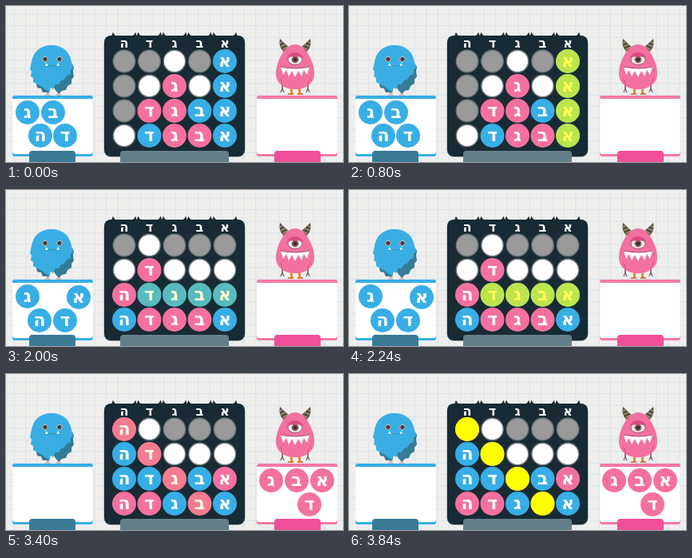
An HTML page for the animation above (4360 ms loop, 422 by 195 pixels).

```html
<!DOCTYPE html>
<html lang="he">
<head>
<meta charset="utf-8">
<style>
  html, body { margin: 0; width: 100%; height: 100%; overflow: hidden; background: #f0f0ed; }
  svg { display: block; width: 100%; height: 100%; }
  text { font-family: "Open Sans", "DejaVu Sans", sans-serif; font-weight: 700; text-anchor: middle; fill: #fff; }
</style>
</head>
<body>
<svg viewBox="0 0 422 195" preserveAspectRatio="none">
  <defs>
    <pattern id="fine" width="4.8" height="4.8" patternUnits="userSpaceOnUse">
      <path d="M.5 0V4.8M0 .5H4.8" stroke="#e8e9e8" stroke-width=".6"/>
    </pattern>
    <pattern id="paper" width="14.4" height="14.4" patternUnits="userSpaceOnUse">
      <path d="M10.5 0V14.4M0 10.5H14.4" stroke="#d6e1ee" stroke-width=".8"/>
    </pattern>
    <g id="tray">
      <rect y="70" width="101" height="6" rx="3"/>
      <rect x=".5" y="1" width="100" height="72" rx="2" fill="#fff"/>
      <path d="M0 4V3Q0 0 3 0H98Q101 0 101 3V4Z"/>
    </g>
    <path id="base" d="M0 14V4Q0 0 4 0H54Q58 0 58 4V14Z"/>
  </defs>
  <rect width="422" height="195" fill="#f0f0ed"/>
  <rect width="422" height="195" fill="url(#fine)"/>
  <rect width="422" height="195" fill="url(#paper)"/>

  <!-- blue monster -->
  <g>
    <path d="M52 105V110M66 105V110" stroke="#c99277" stroke-width="1.6"/>
    <path d="M49 111H55M63 111H69" stroke="#c99277" stroke-width="1.2"/>
    <path d="M78 66L85 76L84 82L85 88L82 92L82 97L77 100L75 105L70 106L66 110L61 104L58 96Z" fill="#347b98"/>
    <path d="M57 49C71 49 80 57 82 70L84 78L81 79L81 85L76 87L73 92L69 93L66 98L62 98L59 104L56 102L54 109L49 107L46 108L44 103L39 102L38 97L34 95L34 90L31 88L32 82L30 79L32 70C34 57 43 49 57 49Z" fill="#3aaee3"/>
    <path d="M55 108L46 108L44 103L39 102L38 97L34 95Q46 101 55 108Z" fill="#347b98"/>
    <g fill="#51392f" stroke="#b9cbd0" stroke-width="1">
      <circle cx="49" cy="66.5" r="3.2"/><circle cx="67" cy="66.5" r="3.2"/>
    </g>
    <path d="M49 75L50.5 71L53 75ZM63 75L65.5 71L67 75Z" fill="#fff"/>
    <path d="M48 75.5Q58 73.5 68 75.5" fill="none" stroke="#2f8ab4" stroke-width=".8"/>
  </g>

  <!-- pink monster -->
  <g>
    <path d="M347 57Q341 50 343 41Q349 47 355 52ZM377 57Q383 50 381 41Q375 47 369 52Z" fill="#575043"/>
    <path d="M342 47L346 44.5M343 51L350 48M346 55L353 51M382 47L378 44.5M381 51L374 48M378 55L371 51" stroke="#b3a67c" stroke-width="1.3"/>
    <path d="M357.5 100V109M367.5 100V109" stroke="#e98b45" stroke-width="3"/>
    <path d="M353 110H360M365 110H372" stroke="#d37b40" stroke-width="2"/>
    <path d="M342 90Q347 96 346 104M382 90Q377 96 378 104" fill="none" stroke="#6d6465" stroke-width="1.5"/>
    <path d="M344 108L346 103L348 108M376 108L378 103L380 108" fill="none" stroke="#6d6465" stroke-width="1.3"/>
    <path d="M362 48C375 48 386 70 386 84C386 97 376 104 362 104C348 104 338 97 338 84C338 70 349 48 362 48Z" fill="#f271a1"/>
    <path d="M343 91Q347 95 346 101M381 91Q377 95 378 101" fill="none" stroke="#cf5583"/>
    <ellipse cx="362" cy="67" rx="9" ry="6.5" fill="#f3eeee" stroke="#a84a72"/>
    <circle cx="362" cy="67" r="4.4" fill="#86585a"/>
    <circle cx="362" cy="67" r="2.3" fill="#302a2b"/>
    <path d="M352 65Q354 58 362 58Q370 58 372 65Q362 61 352 65Z" fill="#d94d83"/>
    <path d="M344 76Q362 80 380 76L377 86L373 80L370 88L366 81L362 89L358 81L354 88L351 80L347 86Z" fill="#fff"/>
    <path d="M344 76Q362 80 380 76" fill="none" stroke="#a84a72"/>
  </g>

  <use href="#tray" x="8" y="112" fill="#36aee6"/>
  <use href="#base" x="29" y="181" fill="#397b95"/>
  <use href="#tray" x="314" y="112" fill="#f477a6"/>
  <use href="#base" x="336" y="181" fill="#f14f97"/>

  <rect x="122.5" y="37.5" width="177" height="151.5" rx="9" fill="#182b34" opacity=".4"/>
  <path id="claws" fill="#182b34"/>
  <rect x="123" y="37" width="176" height="151" rx="8" fill="#182b34"/>
  <path d="M143 195V185Q143 181 147 181H275Q279 181 279 185V195Z" fill="#647f87"/>
  <g id="headers"></g>
  <g id="scenes"></g>
</svg>
<script>
const LETTERS = "הדגבא";
const COLORS = { b: "#38aee6", p: "#f4719f" };
const FADE_START = 520, STEP = 40, STEPS = 12, LOOP = 4360;

// Cells: b/p = coloured token, w = open slot, g = closed slot.
const SCENES = [
  { start: 0, rows: ["ggwgb", "gwpwb", "gppbb", "wbppb"], wins: [[4, 0], [4, 1], [4, 2], [4, 3]],
    tray: [["ג", 27, 133], ["ב", 59, 133], ["ה", 43, 162], ["ד", 74, 162]], color: "b" },
  { start: 1440, rows: ["gwggg", "wpwww", "pbbbb", "bpppb"], wins: [[1, 2], [2, 2], [3, 2], [4, 2]],
    tray: [["ג", 27, 133], ["א", 91, 134], ["ה", 42, 163], ["ד", 74, 163]], color: "b" },
  { start: 2880, rows: ["pwggg", "bpwww", "bbpbp", "ppbpb"], wins: [[0, 0], [1, 1], [2, 2], [3, 3]],
    tray: [["ג", 332, 133], ["ב", 364, 133], ["א", 396, 133], ["ד", 380, 163]], color: "p" }
];

const byId = id => document.getElementById(id);
const cellX = col => 148 + 31.5 * col;
const cellY = row => 69 + 31 * row;
const circle = (x, y, r, fill, extra = "") => `<circle cx="${x}" cy="${y}" r="${r}" fill="${fill}" ${extra}/>`;
const letter = (char, x, y, size) => `<text x="${x}" y="${y}" font-size="${size}">${char}</text>`;
const token = (char, x, y, color) => circle(x, y, 15, COLORS[color]) + letter(char, x, y + 6.5, 22);

function cell(kind, col, row) {
  const x = cellX(col), y = cellY(row);
  if (COLORS[kind]) return token(LETTERS[col], x, y, kind);
  return circle(x, y, 13.7, kind === "w" ? "#fff" : "#9a9a9a", 'stroke="#6f777b" stroke-width="1.4"');
}

function sceneMarkup({ rows, wins, tray, color }) {
  const cells = rows.flatMap((line, row) => [...line].map((kind, col) => cell(kind, col, row)));
  const pieces = tray.map(([char, x, y]) => token(char, x, y, color));
  const glow = wins.map(([col, row]) => circle(cellX(col), cellY(row), 15, "#ff0"));
  return `<g>${cells.join("")}${pieces.join("")}<g>${glow.join("")}</g></g>`;
}

// A pair of small claws frames each column heading.
byId("claws").setAttribute("d", [...LETTERS].flatMap((_, col) => [-1, 1].map(side => {
  const x = cellX(col) + 14 * side;
  return `M${x + 2 * side} 38L${x} 32.5Q${x - side} 36 ${x - 5 * side} 38Z`;
})).join(""));
byId("headers").innerHTML = [...LETTERS].map((char, col) => letter(char, cellX(col), 51.7, 16)).join("");
byId("scenes").innerHTML = SCENES.map(sceneMarkup).join("");
const groups = [...byId("scenes").children];

function draw() {
  const time = performance.now() % LOOP;
  const active = SCENES.findLastIndex(scene => time >= scene.start);
  const step = Math.floor((time - SCENES[active].start - FADE_START) / STEP) + 1;
  groups.forEach((group, i) => group.setAttribute("display", i === active ? "inline" : "none"));
  groups[active].lastElementChild.querySelectorAll("circle").forEach(dot =>
    dot.setAttribute("opacity", Math.max(0, Math.min(1, step / STEPS))));
  requestAnimationFrame(draw);
}
draw();
</script>
</body>
</html>
```
